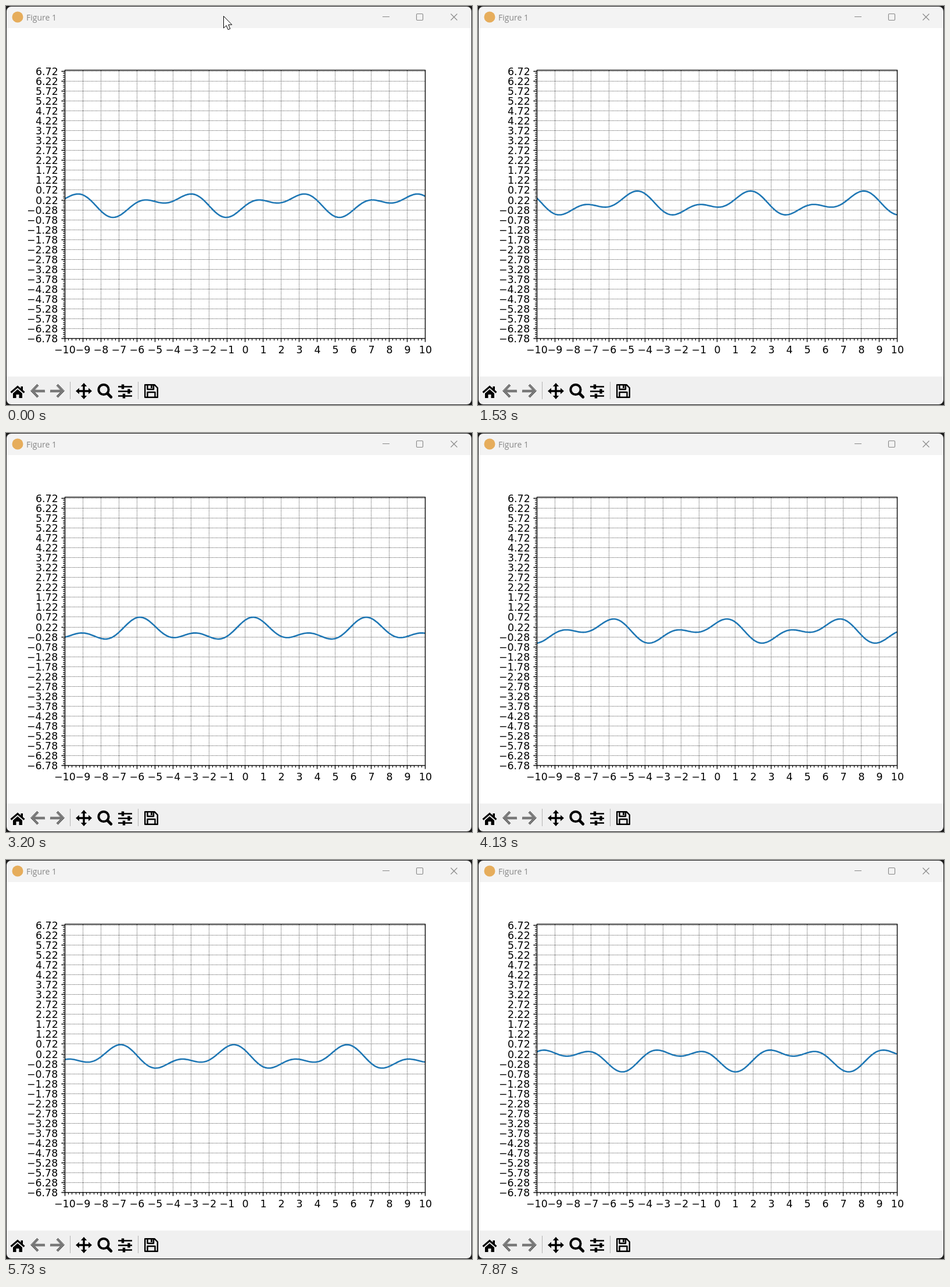
Write an HTML page that moves like this. It is 802 px wide and 687 px high and loops after 8 s.

```html
<!DOCTYPE html>
<html lang="en">
<head>
<meta charset="utf-8">
<title>Figure 1</title>
<style>
  html, body { margin: 0; width: 100%; height: 100%; overflow: hidden; background: #1b1b1b; }
  svg { display: block; }
  .title { font: 14px "Open Sans", "Noto Sans", sans-serif; fill: #868686; }
  .label { font: 17.36px "DejaVu Sans", sans-serif; fill: #000; }
  .grid { stroke: #000; stroke-width: .87; stroke-dasharray: .868 1.432; fill: none; }
  .axis { stroke: #000; stroke-width: 1.39; fill: none; }
  .axis.minor { stroke-width: 1.04; }
  .control { stroke: #868686; stroke-width: 1.1; fill: none; }
  .line { fill: none; stroke: #000; }
  .disabled { fill: none; stroke: url(#stipple); stroke-width: 4.4; }
</style>
</head>
<body>
<svg width="802" height="687" viewBox="0 0 802 687">
  <defs>
    <clipPath id="window"><rect x="1" y="1" width="800" height="685" rx="8"/></clipPath>
    <clipPath id="plot"><rect x="101" y="110" width="620" height="462"/></clipPath>
    <pattern id="stipple" width="2" height="2" patternUnits="userSpaceOnUse">
      <path d="M0 0h1v1h-1zM1 1h1v1h-1z" shape-rendering="crispEdges"/>
    </pattern>
  </defs>

  <g clip-path="url(#window)">
    <rect width="802" height="38" fill="#f3f3f3"/>
    <rect y="38" width="802" height="600" fill="#fff"/>
    <rect y="638" width="802" height="49" fill="#f0f0f0"/>
  </g>

  <circle cx="20" cy="19" r="9.5" fill="#e6ad5c"/>
  <text class="title" x="35" y="25">Figure 1</text>
  <g class="control">
    <path d="M648 18.5h12M765.5 13.5l11 11M776.5 13.5l-11 11"/>
    <rect x="706.5" y="13.5" width="11" height="11" rx="1.5"/>
  </g>

  <g id="grid" class="grid"></g>
  <path id="curve" clip-path="url(#plot)" fill="none" stroke="#1f77b4" stroke-width="2.604" stroke-linejoin="round"/>
  <path id="majorTicks" class="axis"/>
  <path id="minorTicks" class="axis minor"/>
  <rect class="axis" x="101.5" y="110.5" width="620" height="462"/>
  <g id="labels" class="label"></g>

  <!-- Toolbar -->
  <g>
    <path class="line" stroke-width="3" d="M8.5 665.5L20 655.5L31.5 665.5"/>
    <path d="M25.5 655h3.5v8l-3.5-3zM12 667l8-7 8 7v8h-5.5v-6h-5v6H12z"/>
    <path class="disabled" d="M55 652.5L45 663L55 673.5M45 663H67"/>
    <path class="disabled" d="M88 652.5L98 663L88 673.5M98 663H76"/>
    <path stroke="#b4b4b4" d="M110.5 647v30M227.5 647v30"/>
    <path class="line" stroke-width="3.4" d="M123 663h22M134 652v22"/>
    <path d="M134 649l5.2 6h-10.4zM134 677l5.2-6h-10.4zM120 663l6-5.2v10.4zM148 663l-6-5.2v10.4z"/>
    <circle class="line" stroke-width="4" cx="168" cy="660.5" r="8.6"/>
    <path class="line" stroke-width="5" stroke-linecap="round" d="M175 667.5l5.7 5.7"/>
    <path class="line" stroke-width="2.4" d="M193 655.5h24M193 663.5h24M193 671.5h24"/>
    <path class="line" stroke-width="4.4" d="M201 651.5v8M211.5 659.5v8M203 667.5v8"/>
    <path class="line" stroke-width="2.4" stroke-linejoin="round"
      d="M239.2 652.2H255.5L260.8 657.5V673.8H239.2zM243.5 652.5v7.5h10.5v-7.5M243.5 673.5v-8.5h13v8.5"/>
    <path d="M249 653h3v5h-3z"/>
  </g>

  <path id="cursor" fill="#fff" stroke="#000" stroke-linejoin="round"
    d="M374.5 17.5V38l4.7-4.4 3 7.1 3.6-1.5-3-7h6z"/>
</svg>

<script>
const LOOP = 8000;
const SLOT = 1000 / 15;
const LEFT = 101, RIGHT = 721, TOP = 110, BOTTOM = 572;
const CENTER_X = 411, CENTER_Y = 341, UNIT_X = 31, UNIT_Y = 462 / 13.56;
const MAJOR = 6.08, MINOR = 3.47;

// Slots of the 15 Hz clock at which the plot is redrawn.
const redraws = [
  0, 1, 2, 4, 5, 7, 9, 10, 12, 13, 15, 16, 18, 20, 21, 23, 25, 26, 28, 30, 31, 33, 34, 36, 37,
  39, 41, 43, 45, 46, 48, 49, 51, 52, 54, 56, 57, 59, 61, 62, 64, 65, 67, 69, 70, 72, 74, 76,
  77, 79, 80, 82, 84, 86, 87, 89, 90, 92, 94, 95, 97, 99, 100, 102, 103, 105, 106, 108, 110,
  112, 113, 115, 117, 118
].map(slot => Math.round(slot * SLOT / 10) * 10);

const byId = id => document.getElementById(id);
const toX = x => CENTER_X + x * UNIT_X;
const toY = y => CENTER_Y - y * UNIT_Y;
const snap = v => Math.floor(v + .5) + .5;

// Labels are aligned by their ink, which sits left of the advance box.
function label(value, digits, x, y, anchor) {
  const shift = value < 0 ? .4 : .9;
  const text = value.toFixed(digits).replace("-", "\u2212");
  return `<text x="${x + shift}" y="${y}" text-anchor="${anchor}">${text}</text>`;
}

function buildAxes() {
  let grid = "", major = "", minor = "", labels = "";
  for (let i = 0; i <= 100; i++) {
    const value = (i - 50) / 5;
    const x = snap(toX(value));
    const foot = `M${x} ${BOTTOM + .5}v`;
    if (i % 5) {
      minor += foot + MINOR;
      continue;
    }
    major += foot + MAJOR;
    grid += `<path d="M${x} ${BOTTOM}V${TOP}"/>`;
    labels += label(value, 0, x - .5, 598, "middle");
  }
  for (let i = 0; i <= 135; i++) {
    const value = -6.78 + i / 10;
    const y = snap(toY(value));
    const foot = `M${LEFT + .5} ${y}h-`;
    if (i % 5) {
      minor += foot + MINOR;
      continue;
    }
    major += foot + MAJOR;
    grid += `<path d="M${LEFT} ${y}H${RIGHT}"/>`;
    labels += label(value, 2, 88.8, y + 6.5, "end");
  }
  byId("grid").innerHTML = grid;
  byId("majorTicks").setAttribute("d", major);
  byId("minorTicks").setAttribute("d", minor);
  byId("labels").innerHTML = labels;
}

function wavePath(step) {
  const slow = 2.415 - step * Math.PI / 50;
  const fast = .87 - step * Math.PI / 5;
  const points = [];
  for (let px = LEFT; px <= RIGHT; px += 2) {
    const x = (px - CENTER_X) / UNIT_X;
    const y = .4 * Math.cos(x - slow) + .3 * Math.cos(2 * x - fast);
    points.push(`${px} ${toY(y).toFixed(2)}`);
  }
  return "M" + points.join("L");
}

const start = performance.now();
let shown = -1;

function draw() {
  const time = (performance.now() - start) % LOOP;
  const step = redraws.findLastIndex(at => at <= time);
  if (step !== shown) {
    shown = step;
    byId("curve").setAttribute("d", wavePath(step));
    byId("cursor").style.display = step === 0 ? "" : "none";
  }
  requestAnimationFrame(draw);
}

buildAxes();
draw();
</script>
</body>
</html>
```
